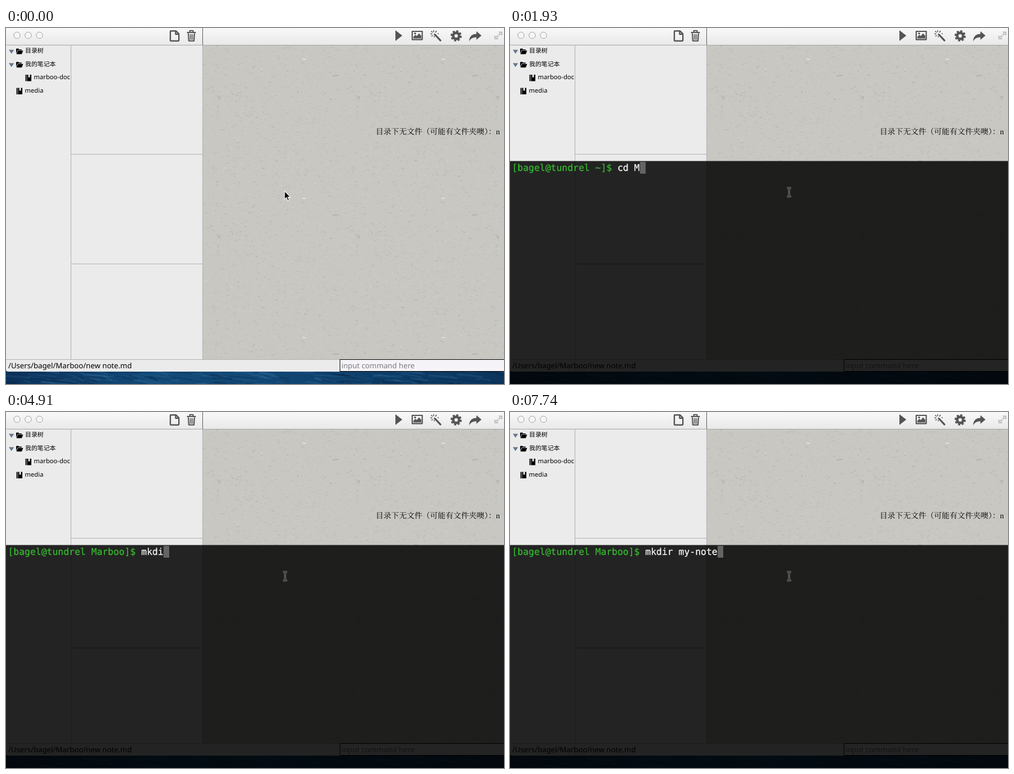
These frames come from a looping animation (885x633 px, 8 s). An HTML page with a canvas:

```html
<!DOCTYPE html>
<html lang="zh-CN">
<head>
<meta charset="utf-8">
<title>Notebook and terminal</title>
<style>
html, body { margin: 0; width: 100%; height: 100%; overflow: hidden; background: #ebebeb; }
canvas, svg { position: absolute; left: 0; top: 0; display: block; }
text { white-space: pre; text-rendering: geometricPrecision; }
.ui { font: 13.2px "Noto Sans", "Open Sans", sans-serif; }
.tree { font: 11.2px "Noto Sans", "Noto Sans CJK SC", "Noto Sans CJK", sans-serif; }
.cjk { font: 10.9px "Noto Sans CJK SC", "Noto Sans CJK", sans-serif; }
.page { font: 13.8px "Liberation Serif", "Noto Serif CJK SC", "Noto Sans CJK SC", "Noto Sans CJK", serif; }
.mono { font: 16.4px "DejaVu Sans Mono", monospace; stroke-width: .3px; }
.green { fill: #36b92f; stroke: #36b92f; }
.white { fill: #f6f6f6; stroke: #f6f6f6; }
</style>
</head>
<body>
<canvas id="back" width="885" height="633"></canvas>
<svg width="885" height="633" viewBox="0 0 885 633">
  <defs>
    <linearGradient id="bar" x1="0" y1="0" x2="0" y2="1">
      <stop offset="0" stop-color="#f8f8f8"/>
      <stop offset=".35" stop-color="#f3f3f3"/>
      <stop offset="1" stop-color="#e9e9e9"/>
    </linearGradient>
    <clipPath id="side"><rect y="30" width="115" height="559"/></clipPath>
    <g id="folder">
      <path d="M0 9V1.4Q0 0 1.2 0H4l1.2 1.4H9q1 0 1 1.2V3H3.4Q2.6 3 2.2 3.9Z"/>
      <path d="M.6 10 2.7 4.6Q3 3.8 3.8 3.8H12.4L10.3 9.2Q10 10 9.2 10Z"/>
    </g>
    <g id="book">
      <path d="M0 .6H1.9V12H0ZM2.7 .6H10.4V12H2.7Z"/>
      <path d="M5 .2H8V6L6.5 4.7 5 6Z" fill="#ebebeb"/>
    </g>
    <path id="twist" d="M0 0H9.4L4.7 7Z" fill="#67788f"/>
  </defs>

  <!-- window panes -->
  <rect width="885" height="30" fill="url(#bar)"/>
  <path d="M0 30H349V589H0Z" fill="#ebebeb"/>
  <path d="M0 589H885V611H4Q0 611 0 608Z" fill="#ebebeb"/>
  <path d="M0 30.5H885" stroke="#a6a6a6"/>
  <path d="M115.5 31V589M349.5 31V589M116 224.5H349M116 419.5H349M0 589.5H885" stroke="#b1b1b1" fill="none"/>
  <path d="M349.5 0V30" stroke="#565656"/>
  <g fill="#f6f6f6" stroke="#a0a0a0">
    <circle cx="19.5" cy="13" r="5.7"/><circle cx="39.5" cy="13" r="5.7"/><circle cx="59.5" cy="13" r="5.7"/>
  </g>

  <!-- toolbar icons -->
  <g fill="none" stroke="#555" stroke-width="2.4" stroke-linejoin="round">
    <path d="M293 5.2H302L307.2 10.4V21.6Q307.2 23 305.8 23H293.4Q292 23 292 21.6V6.4Q292 5.2 293 5.2ZM301.5 5.5V11H307"/>
    <path d="M324 9.5 325 23H334L335 9.5" stroke-width="2.2"/>
    <path d="M321.5 8H337.5M326.5 7.5V4.8H332.5V7.5" stroke-width="2"/>
    <path d="M327.5 11V21M329.5 11V21M331.6 11V21" stroke-width="1.2"/>
    <rect x="721.9" y="6" width="17.8" height="14.6" stroke-width="2.2"/>
    <path d="M762 11.5 772 22.2" stroke-width="3.2" stroke-linecap="round"/>
    <path d="M760 4V7.5M754 10.5H757.5M755.5 5.5 758 8M765 5 763.2 8M756 15 758.4 13M767 10H769M761 14V16.5" stroke-width="1.5"/>
    <circle cx="800" cy="14" r="5.4" stroke-width="4.6"/>
    <circle cx="800" cy="14" r="8.6" stroke-width="2.8" stroke-dasharray="3.7 3.05" stroke-linejoin="miter"/>
  </g>
  <g fill="#555">
    <path d="M692 4 704.3 13.5 692 23Z"/>
    <path d="M724 18.6V15.5L727.5 12.2 730 14.2 734 9.5 738 14V18.6Z"/>
    <circle cx="727" cy="9.8" r="1.8"/>
    <path d="M823 23.5Q823.5 11 836 10.4V5.8L845 13.4 836 21V16.4Q827.5 16 823 23.5Z"/>
  </g>
  <path d="M876 7H881.5V12.5L879.6 10.6 877 13.2 875.2 11.4 877.8 8.8ZM874.2 19.5H868.6V14L870.5 15.9 873.1 13.3 874.9 15.1 872.3 17.7Z" fill="#dadada" stroke="#a9a9a9"/>

  <!-- directory tree -->
  <g clip-path="url(#side)">
    <use href="#twist" x="5" y="38.8"/><use href="#twist" x="5" y="62.4"/>
    <use href="#folder" x="18" y="36.5"/><use href="#folder" x="18" y="60.2"/>
    <use href="#book" x="34.6" y="82.4"/><use href="#book" x="18.6" y="106"/>
    <text class="cjk" x="34" y="44.2">目录树</text>
    <text class="cjk" x="34" y="67.7">我的笔记本</text>
    <text class="tree" x="49.6" y="91">marboo-doc</text>
    <text class="tree" x="33.6" y="114.8">media</text>
  </g>

  <text class="page" x="657" y="188.5">目录下无文件（可能有文件夹噢）：n</text>
  <text class="ui" x="4" y="605.4">/Users/bagel/Marboo/new note.md</text>
  <rect x="593.5" y="589.5" width="300" height="21" fill="#f6f4f8" stroke="#000"/>
  <text class="ui" x="596" y="604.6" fill="#7b7b82">input command here</text>

  <path id="arrow" d="M495 290V304.6L498.4 301.5 500.8 307 503.2 306 500.9 300.6H505.4Z" stroke="#fff" stroke-width="1.1"/>

  <!-- drop-up terminal, drawn at its resting place -->
  <g id="term">
    <rect y="237" width="885" height="396" opacity=".85"/>
    <rect y="236" width="885" height="1" opacity=".4"/>
    <text class="mono" x="3.5" y="254.3"><tspan class="green" id="p0"></tspan><tspan class="white" id="c0"></tspan></text>
    <text class="mono" x="3.5" y="275.3"><tspan class="green" id="p1"></tspan></text>
    <rect id="caret" width="10" height="21"/>
  </g>
  <g id="beam" fill="none">
    <path d="M492.3 284.2H494.5L496 285.6 497.5 284.2H499.7M496 285.6V298.4M492.3 299.8H494.5L496 298.4 497.5 299.8H499.7" stroke="#9b9b9b" stroke-width="3"/>
    <path d="M492.3 284.2H494.5L496 285.6 497.5 284.2H499.7M496 285.6V298.4M492.3 299.8H494.5L496 298.4 497.5 299.8H499.7" stroke="#111" stroke-width="1.2"/>
  </g>
</svg>

<script>
const $ = id => document.getElementById(id);
const LOOP = 8000, CELL = 9.873, LEFT = 3.5, ROW = 21;
const HOME = '[bagel@tundrel ~]$ ', DIR = '[bagel@tundrel Marboo]$ ';

// start time, first prompt, typed text, second prompt
const steps = [
  [750, HOME, ''], [1490, HOME, 'c'], [1640, HOME, 'cd'], [1790, HOME, 'cd '],
  [1930, HOME, 'cd M'], [2380, HOME, 'cd Ma'], [2680, HOME, 'cd Marboo/'],
  [3280, HOME, 'cd Marboo/', DIR],
  [4320, DIR, ''], [4620, DIR, 'm'], [4770, DIR, 'mk'], [4910, DIR, 'mkdi'],
  [5060, DIR, 'mkdir'], [5200, DIR, 'mkdir '], [5950, DIR, 'mkdir m'],
  [6390, DIR, 'mkdir my'], [7290, DIR, 'mkdir my-'], [7590, DIR, 'mkdir my-no'],
  [7740, DIR, 'mkdir my-note']
];

function random(seed) {
  return () => (seed = (seed * 16807) % 2147483647) / 2147483647;
}

function drawPaper(g) {
  const rnd = random(71), tile = 247.5;
  g.save();
  g.beginPath();
  g.rect(350, 31, 535, 558);
  g.clip();
  g.fillStyle = '#c8c7c2';
  g.fillRect(350, 30, 535, 560);
  const mark = (x, y, dx, dy, bend, color, width) => {
    g.strokeStyle = color;
    g.lineWidth = width;
    for (let i = -1; i < 3; i++) for (let j = -1; j < 3; j++) {
      const px = 350 + x + i * tile, py = 30 + y + j * tile;
      g.beginPath();
      g.moveTo(px, py);
      g.quadraticCurveTo(px + dx / 2, py + dy / 2 + bend, px + dx, py + dy);
      g.stroke();
    }
  };
  for (let i = 0; i < 1500; i++) {
    const x = rnd() * tile, y = rnd() * tile, dark = rnd() < .6;
    const a = (.04 + rnd() * .13).toFixed(3);
    mark(x, y, 1 + rnd() * 4, (rnd() - .5) * 2.5, (rnd() - .5) * 2,
      dark ? `rgba(95,92,82,${a})` : `rgba(235,234,228,${a * 1.6})`, .6 + rnd() * .6);
  }
  for (let i = 0; i < 45; i++) {
    mark(rnd() * tile, rnd() * tile, (rnd() - .3) * 7, (rnd() - .5) * 4, (rnd() - .5) * 4,
      'rgba(100,97,88,.3)', .8);
  }
  mark(177, 25.5, 5, .5, -1, 'rgba(245,244,240,.8)', 1.4);
  mark(50, 183, 4, -1, 0, 'rgba(240,239,234,.6)', 1.1);
  mark(26, 90, 3, 6, 2, 'rgba(110,107,98,.4)', 1);
  mark(31, 91, -2, 6, 1, 'rgba(110,107,98,.4)', 1);
  mark(230, 56, 12, -1, -2, 'rgba(110,107,98,.4)', 1);
  g.restore();
}

function drawSea(g) {
  const rnd = random(19);
  const grad = g.createLinearGradient(0, 0, 885, 0);
  [[0, '#0b3158'], [.3, '#124a78'], [.55, '#114673'], [.8, '#0d3c66'], [1, '#0b345c']]
    .forEach(([at, color]) => grad.addColorStop(at, color));
  g.fillStyle = grad;
  g.fillRect(0, 606, 885, 27);
  g.save();
  g.beginPath();
  g.rect(0, 606, 885, 27);
  g.clip();
  for (let i = 0; i < 150; i++) {
    const x = rnd() * 900 - 20, y = 609 + rnd() * 25, len = 12 + rnd() * 45;
    g.strokeStyle = rnd() < .5 ? 'rgba(60,125,175,.22)' : 'rgba(3,25,55,.25)';
    g.lineWidth = 1 + rnd() * 2.5;
    g.beginPath();
    g.moveTo(x, y);
    g.quadraticCurveTo(x + len / 2, y + 1, x + len, y + 5 * rnd() + 2);
    g.stroke();
  }
  g.restore();
}

function show(id, on) {
  $(id).setAttribute('visibility', on ? 'visible' : 'hidden');
}

let last = '';
function render(t) {
  const index = steps.findLastIndex(s => s[0] <= t);
  const rising = t >= 750 && t < 890;
  const key = index + '/' + rising;
  if (key === last) return;
  last = key;

  const open = index >= 0;
  $('term').style.display = open ? '' : 'none';
  show('arrow', !open || rising);
  show('beam', open && !rising);
  if (!open) return;

  const [, prompt, typed, next = ''] = steps[index];
  $('p0').textContent = prompt;
  $('c0').textContent = typed;
  $('p1').textContent = next;
  $('term').setAttribute('transform', `translate(0 ${rising ? 120 : 0})`);
  $('term').setAttribute('opacity', rising ? .56 : 1);

  const col = next ? next.length : prompt.length + typed.length;
  const caret = $('caret'), inset = rising ? .5 : 0;
  caret.setAttribute('x', Math.round(LEFT + col * CELL) + inset);
  caret.setAttribute('y', 238 + (next ? ROW : 0) + inset);
  caret.setAttribute('width', 10 - inset * 2);
  caret.setAttribute('height', ROW - inset * 2);
  caret.setAttribute('fill', rising ? 'none' : '#646464');
  caret.setAttribute('stroke', rising ? '#b4b4b4' : 'none');
}

const g = $('back').getContext('2d');
drawPaper(g);
drawSea(g);

const start = performance.now();
function frame() {
  render((performance.now() - start) % LOOP);
  requestAnimationFrame(frame);
}
frame();
</script>
</body>
</html>
```
